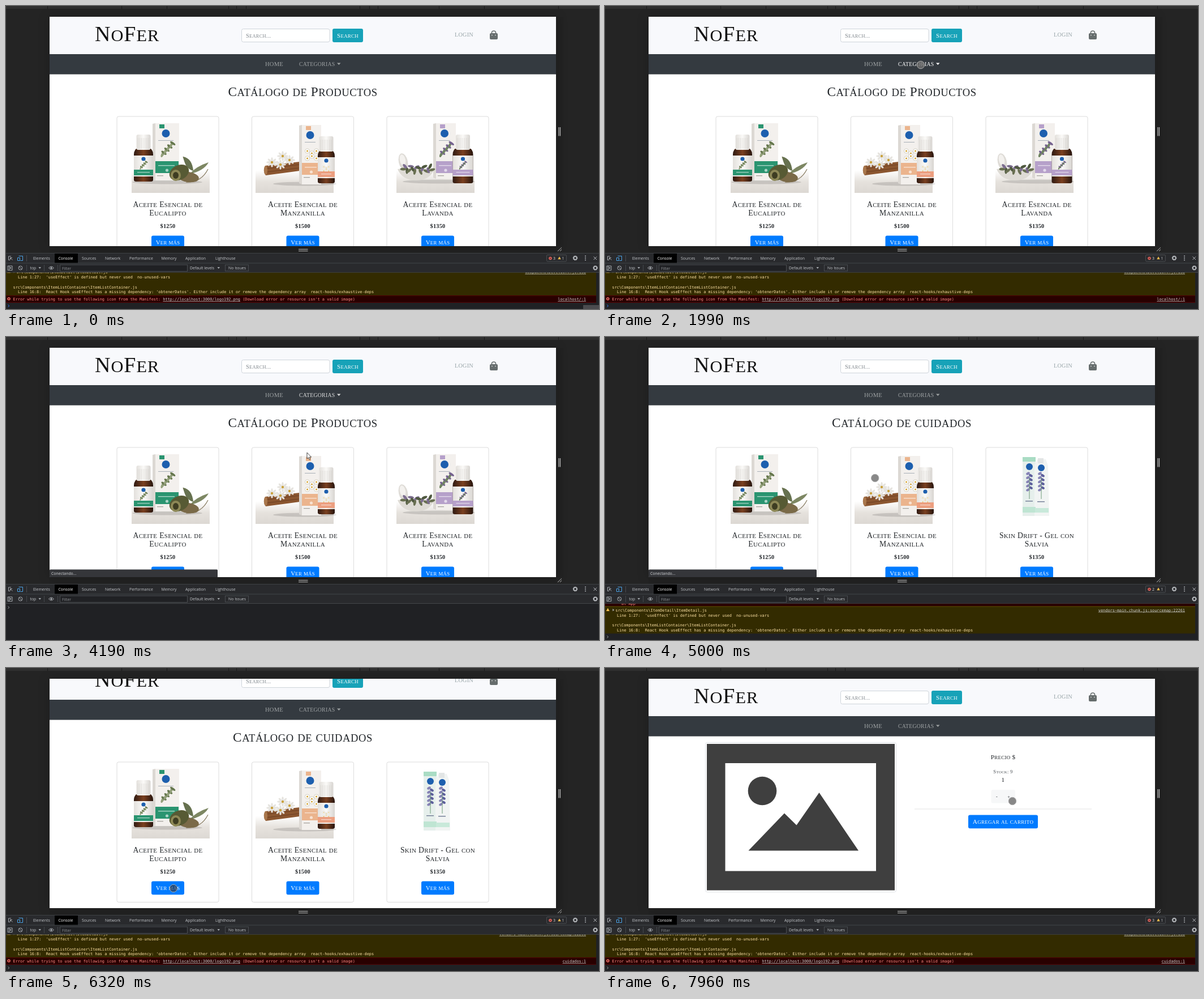
An HTML page that plays this animation: 1048 by 535 pixels, repeating every 8 s.

```html
<!DOCTYPE html>
<html lang="es">
<head>
<meta charset="utf-8">
<title>Catálogo</title>
<style>
html, body { margin: 0; width: 100%; height: 100%; overflow: hidden; background: #242424; }
svg { display: block; width: 1048px; height: 535px; }
text { white-space: pre; }
.caps { font-family: "Liberation Serif", serif; letter-spacing: .025em; }
.ui { font: 6.9px "Open Sans", sans-serif; }
.mono { font: 6.88px "DejaVu Sans Mono", monospace; }
</style>
</head>
<body>
<svg id="stage" viewBox="0 0 1048 535" xmlns="http://www.w3.org/2000/svg"></svg>
<script>
const rect = (x, y, w, h, fill, more = '') =>
  `<rect x="${x}" y="${y}" width="${w}" height="${h}" fill="${fill}" ${more}/>`;
const circle = (x, y, r, fill, more = '') => `<circle cx="${x}" cy="${y}" r="${r}" fill="${fill}" ${more}/>`;
const oval = (x, y, rx, ry, fill, turn = 0) =>
  `<ellipse rx="${rx}" ry="${ry}" fill="${fill}" transform="translate(${x} ${y}) rotate(${turn})"/>`;
const path = (d, fill, more = '') => `<path d="${d}" fill="${fill}" ${more}/>`;
const line = (d, color, width = 1) => path(d, 'none', `stroke="${color}" stroke-width="${width}"`);
const group = (id, body) => `<g id="${id}">${body}</g>`;
const label = (kind, x, y, str, fill, more = '') =>
  `<text class="${kind}" x="${x}" y="${y}" fill="${fill}" ${more}>${str}</text>`;
const ui = (x, y, str, fill = '#c3c6ca') => label('ui', x, y, str, fill);
const mono = (x, y, str, fill, more) => label('mono', x, y, str, fill, more);
const link = (y, id) =>
  mono(1025, y, '', '#d0d0d0', `id="${id}" text-anchor="end" text-decoration="underline"`);

// Small capitals: lowercase runs become smaller capitals.
function caps(x, y, size, str, fill = '#212529', more = 'text-anchor="middle"') {
  const body = str.replace(/\p{Ll}+/gu, s => `<tspan font-size="${size * .8}">${s.toUpperCase()}</tspan>`);
  return label('caps', x, y, body, fill, `font-size="${size}" ${more}`);
}
const button = (cx, y, w, str, size) =>
  rect(cx - w / 2, y, w, 23.7, '#007bff', 'rx="3"') + caps(cx, y + 15.5, size, str, '#fff');

// Products
const range = n => [...Array(n).keys()];
const LOGO = '#1d5fae';

function sprig(x, y, kind) {
  if (kind === 'daisy') return range(6).map(i => {
    const px = x + (i % 3 - 1) * 8, py = y + (i > 2 ? 9 : 0) + i % 2 * 4;
    return circle(px, py, 4, '#fff', 'stroke="#c9c5b4" stroke-width=".8"') + circle(px, py, 1.5, '#d3a02a');
  }).join('');
  const [a, b] = kind === 'leaf' ? ['#66774e', '#93a07a'] : ['#75628f', '#6f8460'];
  return line(`M${x - 10} ${y + 13}Q${x} ${y + 4} ${x + 10} ${y - 11}`, '#73805c', .8) +
    range(8).map(i => oval(x - 9 + i * 2.6, y + 9 - i * 2.8, 5.4, 2.1, i % 2 ? a : b, i % 2 ? 35 : -65)).join('');
}

function carton(x, y, w, h, color, kind) {
  return path(`M${x} ${y + 1}l5 -1v${h}l-5 -2z`, '#dcd8d3') + rect(x + 5, y, w - 5, h, '#f3f0ed') +
    rect(x + 12, y + 2, 9, 7, color) + circle(x + w / 2, y + 18, 7, LOGO) +
    rect(x + 10, y + 30, w - 20, 1, '#a9b0b8') + sprig(x + w / 2 + 3, y + 46, kind) +
    rect(x + 5, y + 67, w - 6, 21, color) + rect(x + 10, y + 74, w - 18, 1.4, '#fff9') +
    circle(x + w / 2 + 2, y + 83, 2.6, '#fff9') + rect(x + 8, y + 92, 11, 1.3, '#a7a49f');
}

function bottle(x, y, w, h, color, kind) {
  const m = x + w / 2;
  return path(`M${x + 4} ${y + 25}H${x + w - 4}Q${x + w} ${y + 29} ${x + w} ${y + 35}V${y + h - 3}q0 3 -4 3H${x + 4}q-4 0 -4 -3V${y + 35}Q${x} ${y + 29} ${x + 4} ${y + 25}z`, 'url(#glass)') +
    rect(m - 12.5, y, 25, 27, 'url(#cap)', 'rx="3"') +
    range(7).map(i => rect(m - 10 + i * 3.1, y + 6, .6, 19, '#d3d0cc')).join('') +
    rect(x, y + 37, w, 37, 'url(#cap)') + circle(m, y + 43, 3.6, LOGO) +
    `<g transform="translate(${m} ${y + 54}) scale(.55)">${sprig(0, 0, kind)}</g>` +
    rect(x, y + 62, w, 10, color) + rect(x + 6, y + 66, w - 12, 1.2, '#fff9');
}

const floor = x => rect(x, 290, 138, 40, 'url(#floor)');
const shade = (x, y, rx) => oval(x, y, rx, 3.5, '#0002');

const eucalyptus = floor(222) + shade(285, 311, 62) + carton(259, 207, 47, 101, '#2a9470', 'leaf') +
  bottle(226, 227, 34, 83, '#2a9470', 'leaf') +
  line('M318 311Q345 312 357 288M313 266L322 290', '#83775c', 1.2) +
  path('M313 266Q329 269 331 291Q317 288 313 266z', '#66714f') +
  path('M324 297Q336 283 358 276Q350 291 324 297z', '#7d8763') +
  oval(322, 302, 19, 9, '#7a6a48', 8) + oval(306, 294, 18, 13, '#575a34', -25) +
  oval(300, 299, 9, 10, '#8d8856') + oval(300, 299, 5, 6, '#3e3d22');

const bloom = (x, y) => range(8).map(i => oval(x + 6 * Math.cos(i * .785), y + 5 * Math.sin(i * .785), 3.8, 1.7, '#e6e4df', i * 45)).join('') +
  circle(x, y, 2.2, '#c9a13c');
const stick = path('M458 282L519 275V291L459 299Q453 291 458 282z', '#8b5630') +
  line('M460 287L518 280M461 293L518 286', '#6c3f22') + oval(459, 290, 3, 8, '#a9774c');
const chamomile = floor(441) + shade(528, 314, 56) + stick +
  bloom(470, 276) + bloom(489, 265) + bloom(501, 272) + bloom(485, 280) +
  carton(518, 210, 39, 105, '#ebb48d', 'daisy') + bottle(551, 230, 30, 83, '#ec9f80', 'daisy');

const lavender = floor(690) + shade(765, 310, 64) + carton(755, 207, 40, 98, '#b6a0ca', 'lavender') +
  bottle(789.5, 227, 36, 86, '#b6a0ca', 'lavender') +
  oval(702, 275, 8, 15, '#dfdcd7', -12) + oval(701, 272, 5, 10, '#f3f1ee', -12) +
  path('M692 288Q724 282 756 290Q748 308 724 308Q700 307 692 288z', '#dedbd5') +
  range(16).map(i => oval(702 + i * 3.4, 288 - 5 * Math.sin(i * 1.9), 5.5, 2.4, ['#697052', '#7c6d8f', '#4f593f'][i % 3], i * 47)).join('');

const stalk = x => range(9).map(i => oval(x + (i % 2 ? 2.5 : -2.5), 241 + i * 3.6, 3.6, 2.2, i % 2 ? '#5d5f9c' : '#8683b6', i % 2 ? 30 : -30)).join('') +
  line(`M${x} 248V286`, '#6f9a78');
const tube = rect(738, 212, 23, 104, '#e6efec') + path('M759 227L764 216H779L783 227L785 316H759z', '#f1f4f3') +
  rect(765, 214, 10, 9, '#e2e5e5') + rect(738, 212, 23, 8, '#a9dcc4') + rect(738, 300, 23, 10, '#bfe5d3') + rect(760, 302, 24, 8, '#c8e9da') +
  circle(750, 229, 6, LOGO) + circle(771, 231, 6, LOGO) + stalk(750) + stalk(771) +
  rect(743, 289, 13, 1.5, '#77829a') + rect(764, 290, 13, 1.5, '#77829a');

function card(cx, first, second, price, photo) {
  return rect(cx - 90, 195, 180, 247.5, '#fff', 'rx="3" stroke="#dcdcdc"') + photo +
    caps(cx, 355, 13.7, first) + caps(cx, 370, 13.7, second) +
    caps(cx, 391.5, 10.3, price, '#212529', 'text-anchor="middle" font-weight="bold"') +
    button(cx, 405.5, 58, 'Ver más', 10.9);
}

const header = rect(77, 19, 895, 66, '#f8f9fc') +
  caps(157, 61.5, 38, 'NoFer', '#111', '') +
  rect(416.5, 40.5, 155.5, 23, '#fff', 'rx="3" stroke="#ced4da"') + caps(424, 55.5, 10.5, 'Search...', '#7f868c', '') +
  rect(577, 40, 54, 24, '#17a2b8', 'rx="3"') + caps(604, 55.7, 11.1, 'Search', '#fff') +
  caps(793, 54, 10.2, 'LOGIN', '#98a5a8', '') +
  rect(855, 48, 14, 11, '#666d6d', 'rx="2"') + line('M858.5 49v-2a3.5 3 0 0 1 7 0v2', '#666d6d', 1.6) +
  circle(859, 51.5, .8, '#fff') + circle(865, 51.5, .8, '#fff') +
  rect(77, 85, 895, 35.6, '#343a40') + caps(458, 106, 10.5, 'HOME', '#9fa3a4', '') +
  group('category', caps(518, 106, 9.8, 'CATEGORIAS', 'inherit', '') + path('M585 100.5h6.5l-3.25 3.4z', 'inherit'));

const products = caps(524.5, 158.5, 23.2, 'Catálogo de Productos');
const care = caps(524.5, 158.5, 23.2, 'Catálogo de cuidados');
const shared = card(286, 'Aceite Esencial de', 'Eucalipto', '$1250', eucalyptus) +
  card(524.5, 'Aceite Esencial de', 'Manzanilla', '$1500', chamomile);

const menu = rect(514, 116.5, 138, 141, '#fff', 'rx="3" stroke="#c9c9c9"') +
  [['CUIDADOS', 135], ['RELAJACION', 165], ['DERMO-COSMÉTICOS', 195], ['TODOS', 236]]
    .map(([s, y]) => caps(529, y, 10.1, s, '#33383d', '')).join('') + rect(514.5, 216.5, 137, 1, '#e9ecef');

const detail = rect(177.5, 131.5, 337, 264, '#fff', 'rx="3" stroke="#dee2e6"') +
  rect(180, 134, 332, 258.5, '#3f3f3f') + rect(212.5, 168, 266.5, 190.5, '#fff') + circle(278, 217, 25.3, '#3f3f3f') +
  path('M253.5 322.5L317 256.5L338.5 277.5L378.5 220L448 322.5z', '#3f3f3f') +
  caps(703.5, 160.5, 11.2, 'Precio $') + caps(703.5, 185.5, 8.7, 'Stock: 9', '#4b5055') + caps(703.5, 201, 11, '1') +
  rect(682.5, 215, 42.5, 23.5, '#f6f7f8', 'rx="3"') + caps(692.5, 229.5, 8, '-') + caps(713.5, 229.5, 8, '+') +
  rect(547, 248.5, 313, 1, '#e4e4e4') + button(703.5, 259.5, 123, 'Agregar al carrito', 11.3);

// Developer tools
const gear = (x, y) => circle(x, y, 2.8, 'none', 'stroke="#b8bbbf" stroke-width="1.8"') +
  circle(x, y, 3.9, 'none', 'stroke="#b8bbbf" stroke-width="1" stroke-dasharray="1.5 1.56"');
const tri = (x, y, s, fill) => path(`M${x} ${y - s}l${s} ${s * 1.8}h${-2 * s}z`, fill);
const stop = (x, y) => circle(x, y, 2.8, '#e46962') + line(`M${x - 1.1} ${y - 1.1}l2.2 2.2m0 -2.2l-2.2 2.2`, '#290000', .8);

const tools = rect(0, 436, 1048, 35, '#292a2d') + rect(0, 453.5, 1048, 1, '#43464a') + rect(0, 470, 1048, 1, '#43464a') +
  rect(0, 436, 1048, .8, '#43464a') + rect(86, 437, 41, 16.5, '#000') +
  line('M9 442H4.5v6.5H7M7.5 444.5l4 4M7.5 448v-3.5h3.5', '#a7abb0') +
  line('M22.5 441.5h7v8h-4M20.5 444.5h4v5h-4z', '#4aa3e8') + rect(36, 440, 1, 11, '#4a4c50') +
  [['Elements', 48], ['Console', 92.5, '#fff'], ['Sources', 134], ['Network', 175], ['Performance', 218],
    ['Memory', 274.5], ['Application', 317], ['Lighthouse', 370]].map(([s, x, c]) => ui(x, 448, s, c)).join('') +
  group('badge', rect(955.5, 439.5, 35, 11.5, 'none', 'rx="1.5" stroke="#494c50"') + stop(962, 445.5) +
    label('ui', 967, 448, '3', '#d8d8d8', 'id="errors"') + tri(978, 445, 2.7, '#f4bd4f') + ui(982.5, 448, '1')) +
  gear(1006, 445) + [441.5, 445, 448.5].map(y => circle(1024, y, 1, '#b8bbbf')).join('') +
  line('M1038.5 442.5l5.5 5.5m0 -5.5l-5.5 5.5', '#b8bbbf') +
  line('M3 459h8v7.5H3zM5.5 459v7.5', '#a7abb0') + path('M7 460.5l3 2-3 2z', '#a7abb0') +
  circle(25.5, 462.5, 3.4, 'none', 'stroke="#a7abb0"') + line('M23 460l5 5', '#a7abb0') +
  ui(42.5, 465, 'top') + path('M57.5 461h4.5l-2.25 3z', '#a7abb0') +
  line('M75.5 462.5q4.5 -5 9 0q-4.5 5 -9 0z', '#a7abb0') + circle(80, 462.5, 1.5, '#a7abb0') +
  [36, 67, 91].map(x => rect(x, 457, 1, 11, '#45484c')).join('') +
  rect(95.5, 457, 225, 11.5, '#202124', 'stroke="#494c50"') + ui(99, 465.5, 'Filter', '#8d9094') +
  ui(325, 465, 'Default levels') + path('M373.5 461h4.5l-2.25 3z', '#a7abb0') +
  rect(387.5, 457, 41, 11, 'none', 'stroke="#494c50"') + ui(393, 465, 'No Issues') + gear(1041.5, 462.5);

const WARN = '#ffe3a6', FAIL = '#ff8b84';
const warning = rect(0, 440, 1043, 36, '#290000') + mono(29, 473, 'at App', FAIL) +
  rect(0, 475.5, 1043, 48, '#332b00') + rect(0, 475.5, 1043, .8, '#665500') +
  tri(5, 481.5, 3, '#f4bd4f') + path('M13.5 479.8l3 2.2-3 2.2z', '#a9a9a9') +
  mono(18.5, 484.5, 'src\\Components\\ItemDetail\\ItemDetail.js', WARN) + link(484.5, 'origin') +
  mono(21, 493.5, "Line 1:27:  'useEffect' is defined but never used  no-unused-vars", WARN) +
  mono(12.5, 511.2, 'src\\Components\\ItemListContainer\\ItemListContainer.js', WARN) +
  mono(21, 520, "Line 16:8:  React Hook useEffect has a missing dependency: 'obtenerDatos'. Either include it or remove the dependency array  react-hooks/exhaustive-deps", WARN);
const failure = rect(0, 511, 1043, 12.5, '#290000') + rect(0, 511, 1043, .8, '#5c0000') + rect(0, 523, 1043, .8, '#5c0000') +
  stop(5, 517) +
  mono(12.5, 520, 'Error while trying to use the following icon from the Manifest: <tspan text-decoration="underline" fill="#d0d0d0">http://localhost:3000/logo192.png</tspan> (Download error or resource isn\'t a valid image)', FAIL) +
  link(520, 'place');

const ramp = (id, stops, vertical) => `<linearGradient id="${id}" ${vertical ? 'x2="0" y2="1"' : ''}>` +
  stops.map((c, i) => `<stop offset="${i / (stops.length - 1)}" stop-color="${c}"/>`).join('') + '</linearGradient>';

document.getElementById('stage').innerHTML =
  `<defs>${ramp('glass', ['#2f1a12', '#7a4020', '#27150e'])}${ramp('cap', ['#e3e0dc', '#fbfaf8', '#d8d5d1'])}
  ${ramp('floor', ['#ffffff', '#e6e2dd', '#dcd8d3'], true)}
  <clipPath id="view">${rect(77, 19, 895, 405, '#000')}</clipPath>
  <clipPath id="log">${rect(0, 470.8, 1048, 65, '#000')}</clipPath></defs>` +
  rect(0, 0, 1048, 535, '#242424') + rect(0, 0, 1048, 5, '#303030') +
  [73, 204, 284, 393, 407, 424, 625, 642, 657, 765, 845, 976].map(x => rect(x, 0, 1, 5, '#1b1b1b')).join('') +
  rect(972, 19, 13, 405, '#222') + rect(77, 424, 895, 12, '#222') +
  rect(77, 19, 895, 405, '#fff', 'style="filter:drop-shadow(0 0 10px #0003)"') +
  line('M977 214v15.5M979.5 214v15.5M517 429.5h16.5M517 432.5h16.5', '#c4c4c4', 1.2) +
  line('M975 433l7 -6.5M979 433l3 -3', '#b5b5b5') +
  `<g clip-path="url(#view)">` +
  group('page', group('header', header) +
    group('list', group('products', products) + group('care', care) + shared +
      group('third', card(763, 'Aceite Esencial de', 'Lavanda', '$1350', lavender)) +
      group('gel', card(763, 'Skin Drift - Gel con', 'Salvia', '$1350', tube))) +
    group('detail', detail) + group('menu', menu)) +
  group('thumb', rect(967, 0, 2.5, 370, '#b4b4b4', 'rx="1"')) +
  group('status', rect(77, 410.5, 297, 14, '#35363a', 'rx="1.5"') + ui(80, 420, 'Conectando...', '#d5d7da')) + '</g>' +
  tools + rect(0, 471, 1048, 64, '#202124') +
  `<g clip-path="url(#log)">` + group('warning', warning) + group('failure', failure) +
  group('prompt', line('M3.5 -2l2.3 2-2.3 2', 'currentColor', 1)) + '</g>' +
  group('corner', rect(1020, 528, 28, 7, '#4b4b4e')) +
  group('pointer', circle(0, 0, 6.7, '#6e6e6e', 'id="dot" fill-opacity=".82" stroke="#a9a9a9" stroke-width="1"') +
    path('M0 0V11L2.5 8.7L4.2 12.5L6 11.7L4.3 8H7.6z', '#fff', 'id="arrow" stroke="#333" stroke-width=".9"'));

// Motion
const $ = Object.fromEntries([...document.querySelectorAll('[id]')].map(e => [e.id, e]));
const show = (el, on) => el.setAttribute('opacity', +on);
const move = (el, x, y) => el.setAttribute('transform', `translate(${x} ${y})`);

// Rows are [time, value, ...]; values are linear between rows.
function track(rows, t) {
  const i = rows.findIndex(r => r[0] > t);
  if (i < 0) return rows.at(-1).slice(1);
  if (!i) return rows[0].slice(1);
  const a = rows[i - 1], b = rows[i], k = (t - a[0]) / (b[0] - a[0]);
  return a.slice(1).map((v, n) => v + (b[n + 1] - v) * k);
}
const trail = [
  [60, 1040, 528], [200, 830, 420], [340, 620, 335], [420, 577, 321], [700, 577, 321], [900, 545, 250],
  [1090, 502, 175], [1230, 492, 138], [1400, 503, 111], [1510, 510, 106], [1560, 510, 106], [1800, 536, 104],
  [2000, 559, 104], [2310, 563, 105], [2480, 563, 105], [2700, 560, 131], [3480, 560, 131], [3800, 543, 178],
  [3990, 532, 204], [4190, 532, 204], [4800, 500, 235], [5100, 466, 256], [5350, 437, 276], [5600, 360, 335],
  [5830, 305, 380], [6080, 296, 389], [6400, 296, 389], [6600, 430, 345], [6850, 640, 276], [7000, 688, 261],
  [7070, 688, 261], [7350, 708, 243], [7620, 717, 235], [7930, 717, 235], [7960, 720, 235]];
const scrolling = [[5270, 0], [5350, 10.5], [5430, 22], [5520, 29], [6520, 29], [6521, 0]];
const bubble = [[3120, 0], [3121, 1], [5280, 1], [5350, .3], [5430, 0]];
const bar = [[5270, 0], [5290, 1], [5800, 1], [6080, 0]];

function draw() {
  const t = performance.now() % 8000;
  const within = (a, b) => t >= a && t < b;
  const [x, y] = track(trail, t), [scroll] = track(scrolling, t);

  move($.pointer, x, y);
  show($.pointer, t >= 70);
  const arrow = within(3560, 4900);
  show($.arrow, arrow);
  show($.dot, !arrow);
  const press = within(2100, 2240) || within(2960, 3120) || within(6260, 6420);
  $.dot.setAttribute('fill', press ? '#2f2f33' : '#6e6e6e');
  $.dot.setAttribute('fill-opacity', press ? .6 : .82);
  show($.corner, t < 140);

  const fresh = t >= 4600, opened = t >= 6520;
  move($.page, 0, -scroll);
  show($.page, !within(4350, 4600));
  show($.list, !opened && !within(4600, 4850));
  show($.products, !fresh);
  show($.third, !fresh);
  show($.care, fresh);
  show($.gel, fresh);
  show($.detail, opened);
  show($.menu, within(2170, 3120));
  $.category.setAttribute('fill', within(1680, 3120) ? '#fff' : within(3120, 4600) ? '#dcdddd' : '#9fa3a4');
  move($.thumb, 0, 19.5 + scroll);
  show($.thumb, track(bar, t)[0]);
  show($.status, track(bubble, t)[0]);

  const empty = within(3600, 4850), partial = within(4850, 5480);
  move($.warning, 0, partial ? 0 : -12.6);
  show($.warning, !empty);
  show($.failure, !empty && !partial);
  show($.badge, !empty);
  $.errors.textContent = partial ? 2 : 3;
  $.origin.textContent = within(4850, 6700) ? 'vendors~main.chunk.js:sourcemap:22261' : 'webpackHotDevClient.js:138';
  $.place.textContent = t < 4850 ? 'localhost/:1' : 'cuidados:1';
  move($.prompt, 0, empty ? 477.5 : 529.5);
  $.prompt.setAttribute('color', t < 3600 ? '#367cf1' : '#9a9da1');
  requestAnimationFrame(draw);
}
draw();
</script>
</body>
</html>
```
